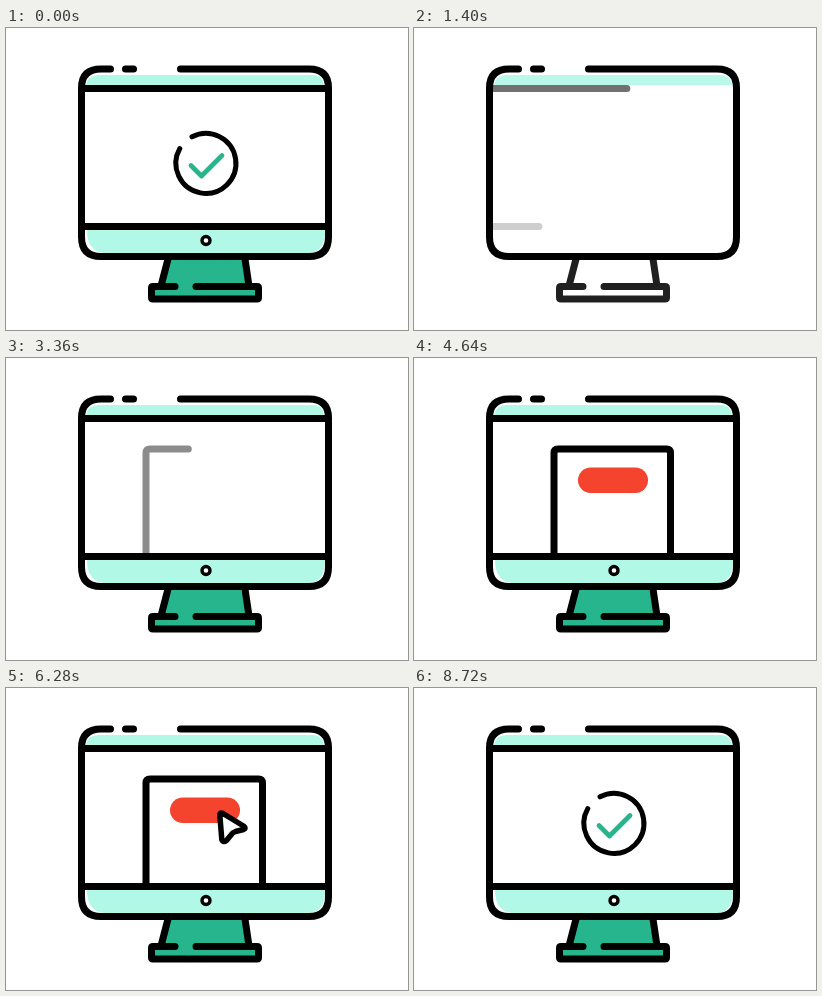
Write an HTML page that moves like this. It is 402 by 302 pixels and loops after 9000 ms.

```html
<!DOCTYPE html>
<html lang="en">
<head>
<meta charset="utf-8">
<title>Monitor</title>
<style>
  html, body { margin: 0; width: 100%; height: 100%; overflow: hidden; background: #fff; }
  svg { display: block; width: 100vw; height: 100vh; }
  .line { fill: none; stroke: #000; stroke-width: 7; stroke-linecap: round; stroke-linejoin: round; }
  .mint { fill: #b2f8e7; }
  .green { fill: #26b58c; }
</style>
</head>
<body>
<!-- data-draw, data-fade, data-pop: start and end in ms; data-out: start and end of the exit -->
<svg viewBox="0 0 402 302">
  <path class="mint" data-fade="1080 1440" d="M80 57Q82 47 92 47H308Q316 47 318 57Z"/>
  <path class="mint" data-fade="1800 2300" d="M81 202H319V207Q317 225 302 225H98Q81 223 81 202Z"/>
  <g class="green" data-fade="2100 2650">
    <path d="M161 232H240L244 259H154Z"/>
    <rect x="146" y="259" width="107" height="12"/>
  </g>
  <g data-fade="660 1510">
    <path class="line" d="M162 231L155 258M239 231L243 258"/>
    <path class="line" d="M169 258.5H147Q145.500 258.500 145.500 260V269.500Q145.500 271 147 271H251Q252.500 271 252.500 269.500V260Q252.500 258.500 251 258.500H190"/>
  </g>

  <path class="line" data-draw="3000 3800" data-out="6900 7400" d="M140 198V95Q140 91 144 91H252.500Q256.500 91 256.500 95V198"/>
  <rect id="button" data-pop="3960 4600" data-out="6800 7200" x="164" y="109.500" width="70" height="25.500" rx="12.750" fill="#f4442d"/>

  <path class="line" data-draw="1040 1690" d="M79 60.500H320"/>
  <path class="line" data-draw="1260 2000" d="M79 198.500H320"/>
  <circle data-pop="2500 2960" cx="200" cy="212.500" r="4" fill="#fff" stroke="#000" stroke-width="3.400"/>

  <path class="line" data-draw="240 1040" d="M174.500 41H303Q322.500 41 322.500 60V209Q322.500 228.500 303 228.500H95Q75.500 228.500 75.500 209V60Q75.500 41 95 41H104.500"/>
  <path class="line" data-draw="240 1040" d="M119.500 41H127.500"/>

  <g id="cursor" data-fade="4880 5200" data-out="7560 7860">
    <path class="line" style="fill:#fff;stroke-width:5.500" d="M213.800 127Q214 123.800 217 125.500L237.500 138Q240.500 140.300 237.500 141.500L229.500 143.500Q226.500 144.500 225 147L220.500 152.500Q217 155 215.800 151.500Z"/>
  </g>

  <path class="line" style="stroke-width:5" data-draw="7680 8360" d="M186 108.800A30 30 0 1 1 173.800 120.600"/>
  <path class="line" style="stroke:#2bb48c;stroke-width:4.800" data-draw="8200 8720" d="M185 137.500L195.500 148L216 127.500"/>
</svg>
<script>
  const LOOP = 9000, HELD = 40;
  const clamp = v => Math.max(0, Math.min(1, v));
  const ramp = (t, [start, end]) => clamp((t - start) / (end - start));
  const smooth = p => p * p * (3 - 2 * p);
  const range = text => text.split(' ').map(Number);
  const cursor = document.getElementById('cursor');
  const button = document.getElementById('button');

  const parts = [...document.querySelectorAll('[data-draw], [data-fade], [data-pop]')].map(el => {
    const { draw, fade, pop, out } = el.dataset;
    if (draw) el.setAttribute('pathLength', 1);
    if (pop) {
      el.style.transformBox = 'fill-box';
      el.style.transformOrigin = 'center';
    }
    return { el, draw, pop, enter: range(draw || fade || pop), exit: out && range(out) };
  });

  function render(time) {
    // The finished picture is held briefly across the loop point.
    const t = time < HELD ? LOOP : time;
    const press = Math.sin(Math.PI * ramp(t, [6320, 6720]));

    for (const { el, draw, pop, enter, exit } of parts) {
      const p = ramp(t, enter) * (exit ? 1 - ramp(t, exit) : 1);
      el.style.opacity = p;
      if (draw) el.style.strokeDasharray = p < 1 ? `${p} 2` : 'none';
      if (pop) el.style.transform = `scale(${smooth(p) * (el === button ? 1 - 0.08 * press : 1)})`;
    }

    const away = 1 - smooth(ramp(t, [4880, 5960])) + smooth(ramp(t, [6840, 7600]));
    const size = 1 - 0.12 * press;
    cursor.setAttribute('transform',
      `translate(${27.5 * away} ${28 * away}) translate(214 125) scale(${size}) translate(-214 -125)`);
  }

  function tick() {
    render(performance.now() % LOOP);
    requestAnimationFrame(tick);
  }
  tick();
</script>
</body>
</html>
```
